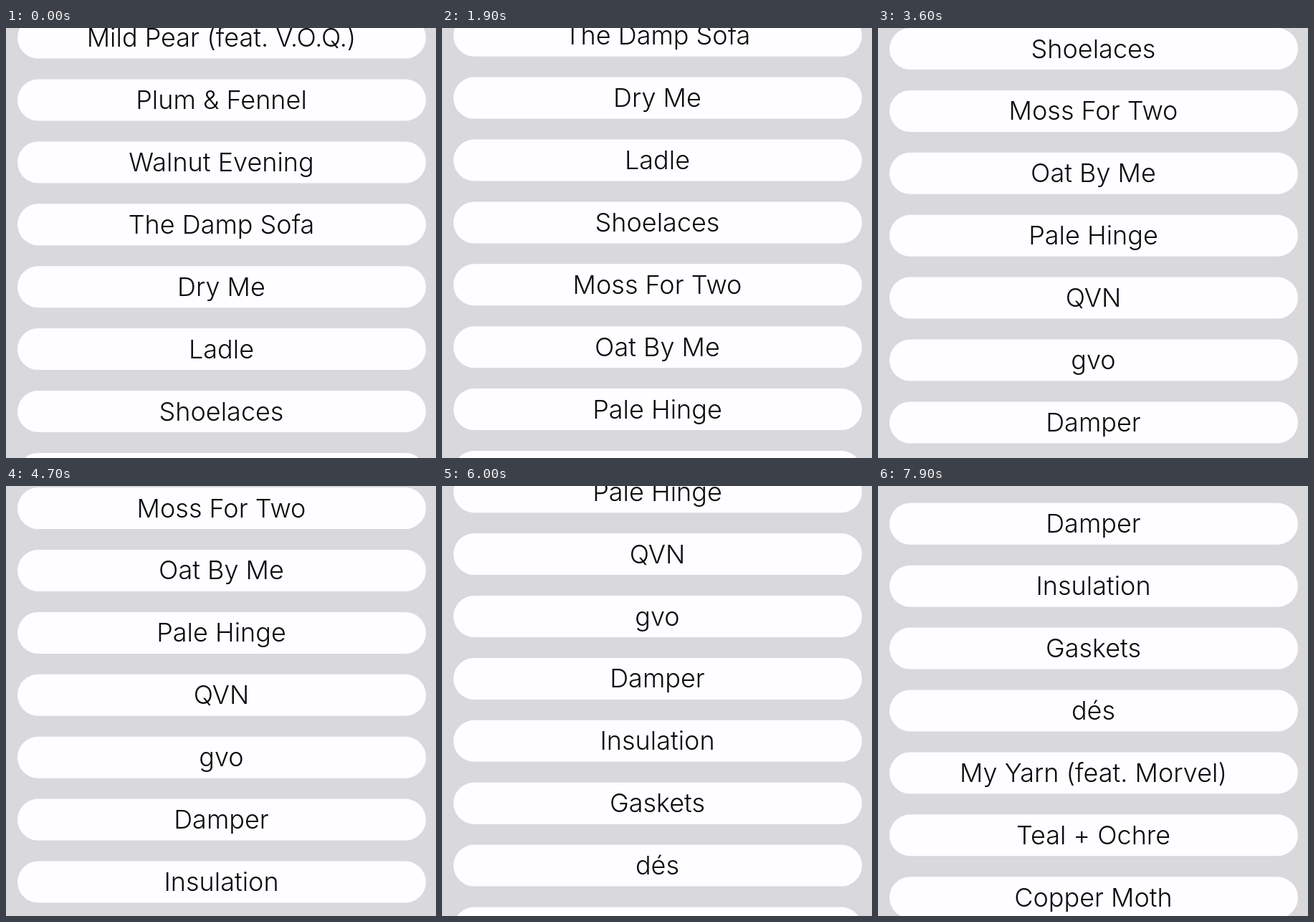
An HTML page that plays this animation: 600x600 px, repeating every 8000 ms.

```html
<!DOCTYPE html>
<html lang="en">
<head>
<meta charset="utf-8">
<title>Scrolling song list</title>
<style>
  html, body { margin: 0; width: 100%; height: 100%; overflow: hidden; background: #d9d8da; }
  svg { display: block; width: 100%; height: 100%; }
  rect { fill: #fefdff; }
  text { font: 300 36px Inter, Lato, sans-serif; fill: #0c0c0e; text-anchor: middle; }
</style>
</head>
<body>
<svg viewBox="0 0 600 600"><g id="list"></g></svg>
<script>
const LOOP = 8000, STEP = 100;
const FIRST_TOP = -15.4, PITCH = 86.9;
const songs = [
  "Mild Pear (feat. V.O.Q.)", "Plum & Fennel", "Walnut Evening", "The Damp Sofa",
  "Dry Me", "Ladle", "Shoelaces", "Moss For Two", "Oat By Me", "Pale Hinge",
  "QVN", "gvo", "Damper", "Insulation", "Gaskets", "dés",
  "My Yarn (feat. Morvel)", "Teal + Ochre", "Copper Moth"
];
// [time in ms, scroll distance]; the list rests between 3600 and 4200
const scrollKeys = [
  [0, 0], [700, 113], [1900, 263.6], [2900, 408], [3600, 506],
  [4200, 506], [4700, 590.8], [6000, 787.5], [7900, 1003.6], [8000, 1015]
];

const list = document.getElementById("list");

function add(tag, attributes, content = "") {
  const node = document.createElementNS(list.namespaceURI, tag);
  for (const name in attributes) node.setAttribute(name, attributes[name]);
  node.textContent = content;
  list.append(node);
}

songs.forEach((song, i) => {
  const top = FIRST_TOP + i * PITCH;
  add("rect", { x: 16, y: top, width: 570, height: 58, rx: 29 });
  add("text", { x: 300.5, y: top + 41.5 }, song);
});

function scrollAt(time) {
  const next = scrollKeys.findIndex(([t]) => t > time);
  const [t0, y0] = scrollKeys[next - 1], [t1, y1] = scrollKeys[next];
  return y0 + (y1 - y0) * (time - t0) / (t1 - t0);
}

function draw() {
  const time = Math.floor(performance.now() % LOOP / STEP) * STEP;
  list.setAttribute("transform", `translate(0 ${-scrollAt(time)})`);
  requestAnimationFrame(draw);
}
draw();
</script>
</body>
</html>
```
